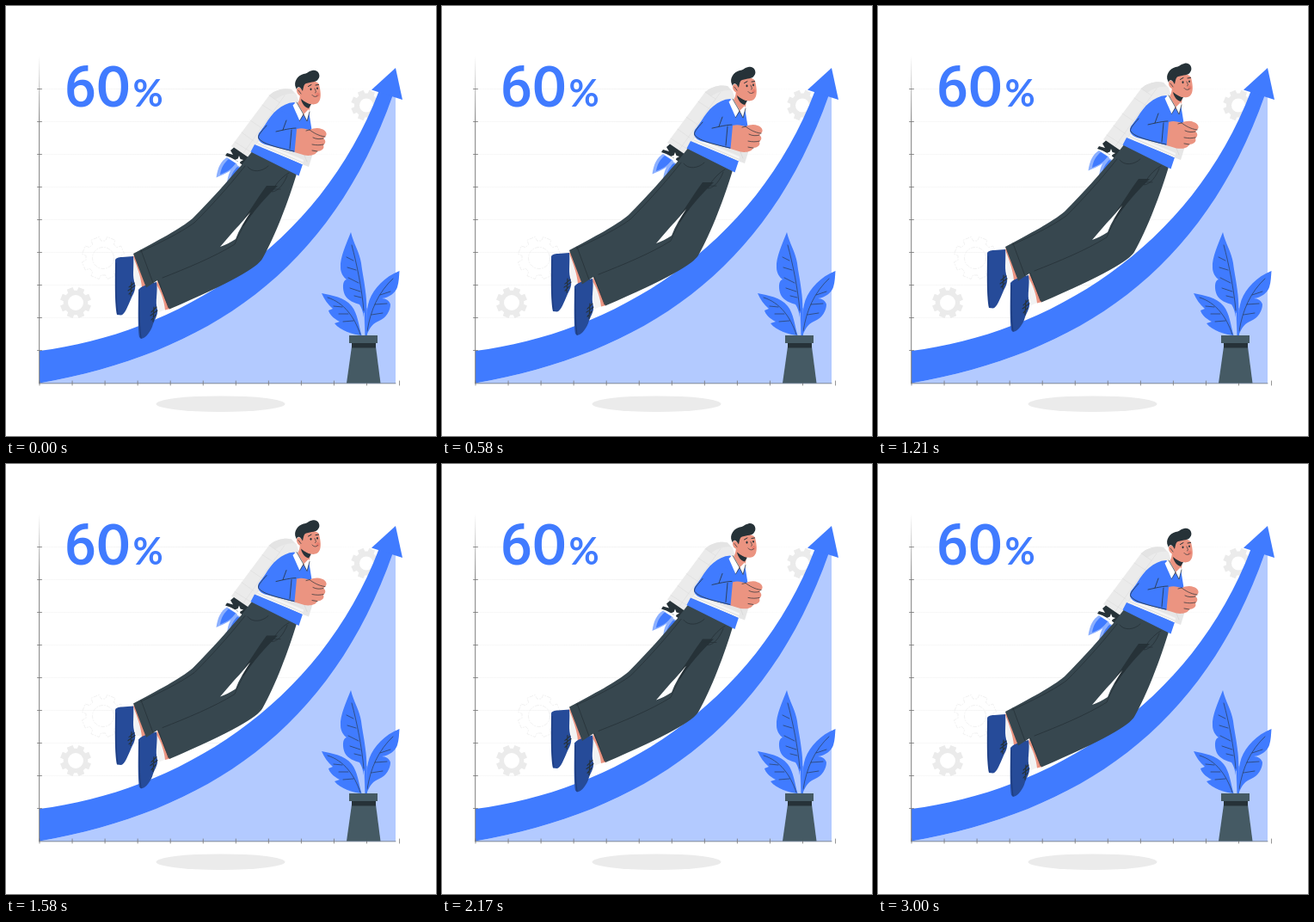
An HTML page with a canvas for the animation above (3040 ms loop, 500 by 500 pixels).

```html
<!DOCTYPE html>
<html lang="en">
<head>
<meta charset="utf-8">
<title>Growth</title>
<style>
html, body { margin: 0; width: 100%; height: 100%; overflow: hidden; background: #fff; }
canvas { display: block; width: 500px; height: 500px; }
</style>
</head>
<body>
<canvas id="stage" role="img" aria-label="60% growth chart with a man flying on a jetpack"></canvas>
<script>
const BLUE = '#407bff', NAVY = '#264b99', DARK = '#263238', SLATE = '#37474f';
const POT = '#455a64', SKIN = '#eb9481', GREY = '#ebebeb', PALE = '#b3caff';
const LOOP = 3040, STEPS = 73, RISE = 10;

const canvas = document.getElementById('stage');
const ctx = canvas.getContext('2d');
const ratio = window.devicePixelRatio || 1;
canvas.width = canvas.height = 500 * ratio;
ctx.lineCap = ctx.lineJoin = 'round';

function fill(color, d) {
  ctx.fillStyle = color;
  ctx.fill(new Path2D(d));
}

function line(color, width, d) {
  ctx.strokeStyle = color;
  ctx.lineWidth = width;
  ctx.stroke(new Path2D(d));
}

function ellipse(color, x, y, rx, ry, turn = 0) {
  ctx.fillStyle = color;
  ctx.beginPath();
  ctx.ellipse(x, y, rx, ry, turn, 0, Math.PI * 2);
  ctx.fill();
}

function text(str, font, x, y) {
  ctx.fillStyle = BLUE;
  ctx.font = font;
  ctx.fillText(str, x, y);
}

function gearPath(x, y, outer, inner, hole) {
  const p = new Path2D();
  const at = (r, a) => [x + r * Math.cos(a), y + r * Math.sin(a)];
  for (let i = 0; i < 8; i++) {
    const a = (i + 0.5) * Math.PI / 4;
    p.lineTo(...at(inner, a - 0.27));
    p.lineTo(...at(outer, a - 0.2));
    p.lineTo(...at(outer, a + 0.2));
    p.lineTo(...at(inner, a + 0.27));
    p.arc(x, y, inner, a + 0.27, a + Math.PI / 4 - 0.27);
  }
  p.closePath();
  p.moveTo(x + hole, y);
  p.arc(x, y, hole, 0, Math.PI * 2);
  return p;
}

function drawGears() {
  ctx.fillStyle = GREY;
  ctx.fill(gearPath(419, 115.5, 18, 14, 8), 'evenodd');
  ctx.fill(gearPath(81, 345, 18.3, 14.3, 9), 'evenodd');
  ctx.strokeStyle = '#e8e8e8';
  ctx.lineWidth = 0.6;
  ctx.setLineDash([4, 2, 1, 2]);
  ctx.stroke(gearPath(113, 293, 25, 20, 12.5));
  ctx.setLineDash([]);
}

function drawGrid() {
  const fade = ctx.createLinearGradient(39, 0, 440, 0);
  fade.addColorStop(0, '#f6f6f6');
  fade.addColorStop(0.5, '#eeeeee');
  fade.addColorStop(1, '#ffffff');
  for (let y = 96.5; y < 420; y += 38) line(fade, 0.7, `M39 ${y}H440`);
}

function drawAxes() {
  const fade = ctx.createLinearGradient(0, 58, 0, 130);
  fade.addColorStop(0, 'rgba(110,110,110,0)');
  fade.addColorStop(1, 'rgba(110,110,110,1)');
  line(fade, 0.9, 'M38.7 58V438.8');
  line('#68748c', 0.9, 'M39 438.8H453');
  for (let i = 0; i < 9; i++) line('#777', 0.8, `M36.5 ${96.5 + i * 38}H41.5`);
  for (let i = 0; i < 12; i++) line('#777', 0.8, `M${39 + i * 38.05} 436V441`);
}

function drawChart() {
  fill(PALE, 'M39 438.5C232 405 378 309 449 100H453V438.5Z');
  fill(BLUE, 'M39 401C197 381 364 282 434 98L450 103C378 309 232 405 39 438.5Z');
  fill(BLUE, 'M453 72L425 97.5L461 109Z');
}

function drawLabel() {
  text('6', '500 66px Roboto, sans-serif', 67.5, 116.5);
  text('0', 'bold 65px Lato, sans-serif', 106, 116.5);
  text('%', 'bold 43px Lato, sans-serif', 147.5, 117);
}

function drawPlant() {
  fill(BLUE, 'M401 263C396 276 388 293 389 304C389 310 392 315 396 318C391 319 391 329 394 336C398 343 405 345 411 347C416 354 417 367 417.5 384H419.5C419 366 420 348 418.5 336C417 321 414 308 413 299C411 286 404 276 401 263Z');
  fill(BLUE, 'M367 334C380 337 393 338 402 349C409 358 410 371 413.5 383C404 382 389 378 382 369L388 367C380 363 376 358 375 354L380 352C374 347 370 341 367 334Z');
  fill(BLUE, 'M457.5 308C440 315 428 328 422.5 342C418 355 420 368 419 384C423 373 427 369 434 366C442 363 447 354 447 347C446 343 442 340 437 340C446 339 453 333 455 327C457 321 457 314 457.5 308Z');
  line(DARK, 0.6, 'M402 278C408 300 414 330 416 354M404 296L396 292M407 307L397 304M410 322L398 316M412 332L400 328M413 339L405 337');
  line(DARK, 0.6, 'M374 339C393 345 405 361 412 382M391 350L381 349M398 358L387 358M404 366L392 367');
  line(DARK, 0.6, 'M450 317C433 333 424 353 420 378M435 336L447 332M429 347L443 346M425 359L438 357');
  line(BLUE, 2.4, 'M418.4 352V385');
  line(PALE, 0.8, 'M416.4 357L417 383');
  fill(POT, 'M402 396H430L435.5 438.5H396Z');
  fill(DARK, 'M402 391H430V397.5H402Z');
  fill(POT, 'M399 383H432V392H399Z');
}

function drawJetpack() {
  fill('#8cb0ff', 'M244.5 199.5C246 188 250 180 257 176L269 184C264 191 255 195 244.5 199.5Z');
  fill(BLUE, 'M249 196C250 188 254 182 259 178L267 183C263 189 257 193 249 196Z');
  fill('#8cb0ff', 'M257 206C258 196 261 189 267 184L277 190L268 205Z');
  fill(BLUE, 'M260 205C261 197 265 191 269 187L276 190L270 203Z');
  fill(GREY, 'M262 163L306 104C313 97 325 95 332 97L338 103L341 113L284 179Z');
  fill('#e4e4e4', 'M306 104C313 97 325 95 332 97L336 102C329 101 319 104 313 109Z');
  line('#dcdcdc', 0.6, 'M306 104L318 112M298 115L312 124M284 133L299 143M274 147L288 157M266 158L285 170M324 104L276 171');
  fill(DARK, 'M265 164.5L284 177.5L278 187C270 181 263 176 255 174L257 171L264 173L261 168Z');
  fill('#fff', 'M271 174L272.5 178L276 179L272.5 181L271 185L269.5 180.5L266 179L269.7 177.5Z');
}

function drawFeet() {
  fill('#f3f3f3', 'M148 290L157 310L161 327L151 325L147 301Z');
  fill(SKIN, 'M149 289L164 327L158 327C157 316 153 304 148 292Z');
  fill('#f3f3f3', 'M174 321L184 340L188 352L178 356L174 333Z');
  fill(SKIN, 'M176 319L191 352L185 353.5C184 343 180 332 175 324Z');
  fill(NAVY, 'M127 296C127 293 131 292 135 292L148 291C149 301 147 311 149 320C152 328 149 333 146 339C142 348 138 359 134 359.5L129 359C126 345 127 312 127 296Z');
  fill(NAVY, 'M154 330C157 326 162 325 167 323L175 321C177 331 173 344 176 353C177 360 172 365 170 373C166 382 162 386 157 387L155 385C153 372 154 345 154 330Z');
  line('#1b3673', 0.8, 'M128 299C128 322 127 341 130 358M155 333C155 354 155 370 157 386');
  line(DARK, 1.1, 'M143 327L149 322M142 331L150 325M143 335L148 330M146 321L145 337');
  line(DARK, 1.1, 'M169 356L175 350M168 360L176 354M169 365L174 359M172 350L171 367');
}

function drawTrousers() {
  fill(SLATE, 'M287 168L338 195C329 225 313 268 298 294C293 303 262 322 190 352.5L176 319L163 327.5L148 288C176 273 203 259 217 247C239 225 258 203 273 186Z');
  fill(DARK, 'M303 209L316 209C300 224 287 240 277 255L270 257C282 241 293 222 303 209Z');
  fill('#fff', 'M249 280C256 272 264 262 271 255L284 240C277 251 271 260 267 271C261 275 255 278 249 280Z');
  line(DARK, 0.8, 'M157 284L171 322M177 319L189 351M182 316C210 305 242 292 266 277C271 264 279 250 287 240');
  line(DARK, 0.8, 'M278 186C258 211 239 232 219 252C201 265 177 276 156 286');
  line(DARK, 0.8, 'M281 187C286 194 298 193 305 186M329 194C321 198 312 209 309 216C317 216 324 205 327 197M303 213L319 213');
}

function drawTorso() {
  fill(BLUE, 'M289 161L345 184L340.5 197.5L284.5 169.5Z');
  fill(BLUE, 'M335 112C320 113 309 125 302 137L294 149L293 160L346 181L356 147L352 122Z');
  fill('#e6e6e6', 'M293 154C306 162 320 166 336 170L357 171L352 187L344 184L291 160Z');
  fill('#f5f5f5', 'M294 157L346 179L345 184L291 161Z');
  line('#d4d4d4', 0.7, 'M293 160L345 182M346 171L350 181');
  fill(BLUE, 'M321 122C310 126 301 139 294 148C291 154 295 159 301 161L335 169.5L339 143L340 130Z');
  line(DARK, 0.8, 'M303 139C297 146 292 151 294 154C299 161 318 165 335 169M314 146L323 144C328 143 333 142 337 142M326 133L322 144M332 144L330 166');
}

function drawHead() {
  fill(SKIN, 'M342 96L355 109L352 126L346 128L338 115C342 110 342 104 342 96Z');
  fill(DARK, 'M343 108C348 112 352 114 355 114L352 119C348 118 344 114 343 108Z');
  fill('#fff', 'M338 111L346 125L341.5 133.5L333.5 115.5Z');
  fill('#fff', 'M346 126L352 120L353 123L350 134Z');
  line(DARK, 0.7, 'M338 112L346 126L341.5 133.5M346 126L350 134L353 123');
  fill(SKIN, 'M344 91C350 86 361 86 364 91C365 96 367 103 365 109C362 117 352 115 347 110C344 107 343 99 344 91Z');
  ellipse(SKIN, 341.5, 99.5, 3.2, 5, -0.4);
  ellipse('#e87f70', 362.5, 103, 2.2, 2.6);
  fill(DARK, 'M337 95C334 88 339 81 346 79C350 79 351 76 356 75C362 73 367 80 363 85C361 89 355 88 349 90C346 91 346 95 345 99L343 96C341 93 338 94 338 97Z');
  ellipse(DARK, 354.5, 96.8, 1, 1.4);
  ellipse(DARK, 362, 95.8, 0.9, 1.3);
  line(DARK, 1, 'M351.5 93.5L355 91.5M360 92L363.5 91.5');
  line(DARK, 0.7, 'M359 96C360 99 361.5 100 359.5 101M356 103.5C358 106 361 106 362.5 104M340 98L343 102');
}

function drawHand() {
  fill(SKIN, 'M338 143C344 141 349 143 353 144C357 142 363 141 367 143C371 144 374 148 372 151L369 154C373 157 371 160 369 162C371 166 366 169 362 169C360 174 352 174.5 347 173.5L335.5 170Z');
  line(DARK, 0.7, 'M353 144C357 147 363 151 371 152M357 153C361 155 365 155 369 154M356 161C361 162 365 162 369 161M356 168L362 169M353 144L349 145');
}

function drawFlyer(dy) {
  ctx.save();
  ctx.translate(0, dy);
  [drawJetpack, drawFeet, drawTrousers, drawTorso, drawHead, drawHand].forEach(part => part());
  ctx.restore();
}

function render(step) {
  ctx.setTransform(ratio, 0, 0, ratio, 0, 0);
  ctx.fillStyle = '#fff';
  ctx.fillRect(0, 0, 500, 500);
  drawGrid();
  drawGears();
  ellipse(GREY, 249.5, 462.7, 75, 9.3);
  drawChart();
  drawAxes();
  drawLabel();
  drawPlant();
  const phase = step / (STEPS - 1);
  drawFlyer(-RISE * (1 - Math.abs(2 * phase - 1)));
}

let shown = -1;
function tick() {
  const t = performance.now() % LOOP;
  // motion advances in even steps, 24 per second
  const step = Math.min(STEPS - 1, Math.floor((t + 5) / (LOOP / STEPS)));
  if (step !== shown) render(shown = step);
  requestAnimationFrame(tick);
}
tick();
</script>
</body>
</html>
```
